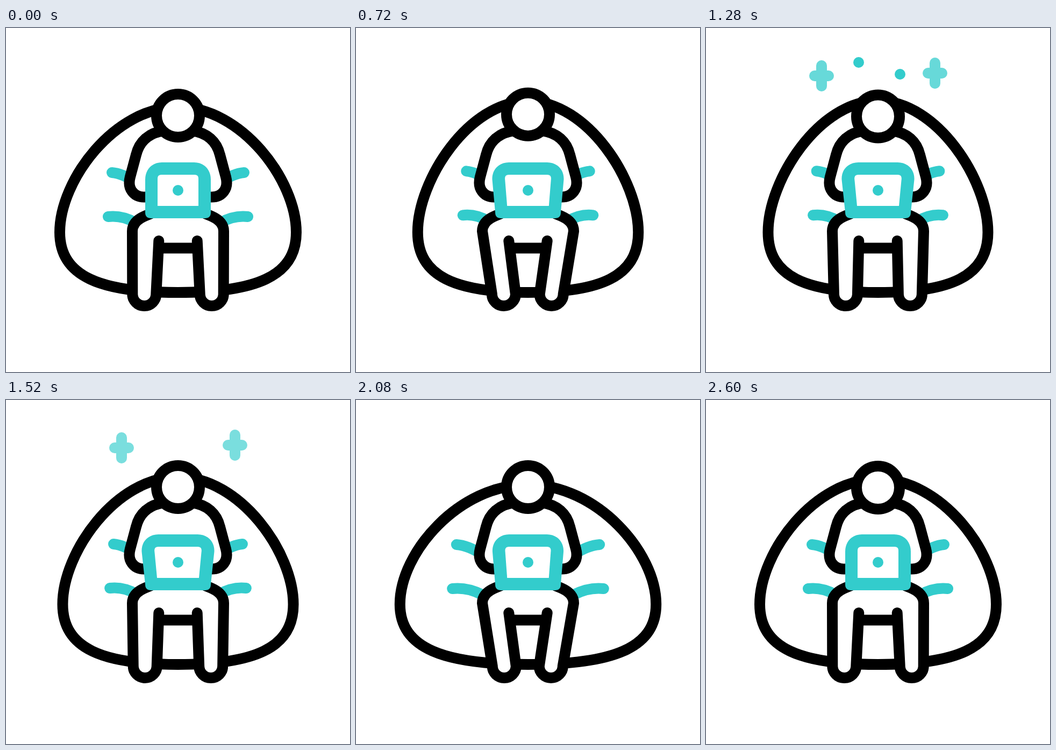
These frames come from a looping animation (640 by 640 pixels, 3000 ms). An HTML page:

```html
<!DOCTYPE html>
<html lang="en">
<head>
<meta charset="utf-8">
<title>Working on a bean bag</title>
<style>
  html, body { margin: 0; width: 100%; height: 100%; overflow: hidden; background: #fff; }
  svg { display: block; width: 100vw; height: 100vh; }
  .line { fill: none; stroke: #000; stroke-width: 20; stroke-linecap: round; stroke-linejoin: round; }
  .white { fill: #fff; }
  .teal { stroke: #3cc; }
  .dot { fill: #3cc; }
</style>
</head>
<body>
<svg viewBox="0 0 640 640">
  <path id="bag" class="line"/>
  <path id="folds" class="line teal"/>

  <path class="line white" d="M264 314.5H257C238 314.5 225 299 231 277L242 236C248 211 266 195 294 191H346C374 195 392 211 398 236L409 277C415 299 402 314.5 383 314.5H376"/>

  <g id="legFill" class="white"><path/><path transform="matrix(-1 0 0 1 640 0)"/></g>
  <path class="line" d="M288 409.5H352"/>
  <g id="legLine" class="line"><path/><path transform="matrix(-1 0 0 1 640 0)"/></g>

  <circle id="head" class="line white" cx="320" r="40"/>

  <path id="laptop" class="dot"/>
  <path id="screen" class="white"/>
  <circle class="dot" cx="320" cy="302" r="10"/>

  <g id="dots" class="dot">
    <circle cx="284" cy="64" r="10"/>
    <circle cx="361" cy="86" r="10"/>
  </g>
  <g id="pluses" class="line teal">
    <path d="M202 89h26M215 70v38"/>
    <path d="M413 84h26M426 65v38"/>
  </g>
</svg>
<script>
  const LOOP = 3000, STEP = 40;
  const FOOT = 257.3;
  const $ = id => document.getElementById(id);
  const smooth = p => p * p * (3 - 2 * p);
  const out = p => 1 - (1 - p) ** 2;
  const linear = p => p;

  // Each key is [time, value, easing on the way to it].
  const tracks = {
    width: [[220, 220], [1040, 202.6, out], [1380, 205], [1880, 255], [2600, 220, out]],
    swing: [[220, 0], [820, 19], [1420, 0], [2020, 19], [2600, 0]],
    head: [[220, 163], [660, 159.8], [980, 169], [1480, 162], [1860, 160.8], [2280, 163]],
    tilt: [[220, 0], [1040, 6.5, out], [1880, 6.5], [2540, 0]],
    dots: [[1000, 0], [1160, 1], [1340, 1], [1500, 0]],
    pluses: [[1160, 0], [1340, 1], [1450, 1], [1650, 0, linear]]
  };

  function at(name, t) {
    const keys = tracks[name];
    if (t <= keys[0][0]) return keys[0][1];
    for (let i = 1; i < keys.length; i++) {
      const [t0, v0] = keys[i - 1], [t1, v1, ease = smooth] = keys[i];
      if (t < t1) return v0 + (v1 - v0) * ease((t - t0) / (t1 - t0));
    }
    return keys[keys.length - 1][1];
  }

  function drawBag(w) {
    const d = w - 220;
    const top = 147 + 0.66 * d - 0.005 * d * d;
    const lift = Math.min(0, 0.18 * d);
    const side = s => {
      const p = (u, y) => `${320 + s * u * w} ${y} `;
      return {
        edge: 'M' + p(0, top) + 'C' + p(0.54, top) + p(1, 284) + p(1, 380) +
          'C' + p(1, 463) + p(0.65, 492) + p(0, 492),
        folds: 'M' + p(0.559, 269 + lift) + 'Q' + p(0.47, 270.5 + lift) + p(0.36, 287 + lift) +
          'M' + p(0.591, 351 + lift) + 'Q' + p(0.475, 348 + lift) + p(0.36, 362 + lift)
      };
    };
    const l = side(-1), r = side(1);
    $('bag').setAttribute('d', l.edge + r.edge);
    $('folds').setAttribute('d', l.folds + r.folds);
  }

  const leg = x =>
    `M270 345L258 350Q235 360 235 378L${x - 22} 495A22 22 0 0 0 ${x + 22} 495L284.3 396`;

  // The right leg swings slightly further than the left.
  function drawLegs(swing) {
    for (const id of ['legFill', 'legLine']) {
      const [left, right] = $(id).children;
      left.setAttribute('d', leg(FOOT + swing));
      right.setAttribute('d', leg(FOOT + swing * 1.08));
    }
  }

  function drawLaptop(s) {
    const l = 259 - s, r = 381 + s, a = 282 - s * 0.9, b = 358 + s * 0.9;
    const k = s * 0.15;
    $('laptop').setAttribute('d',
      `M259 343L${l} 282C${l - k} 263 ${l + 13} 250 ${l + 31} 250H${r - 31}` +
      `C${r - 13} 250 ${r + k} 263 ${r} 282L381 343Q381 354 370 354H270Q259 354 259 343Z`);
    $('screen').setAttribute('d',
      `M${282 - k} 331L${a} 280Q${a} 273 ${a + 7} 273H${b - 7}Q${b} 273 ${b} 280L${358 + k} 331Z`);
  }

  function draw(t) {
    drawBag(at('width', t));
    drawLegs(at('swing', t));
    drawLaptop(at('tilt', t));
    $('head').setAttribute('cy', at('head', t));
    $('dots').setAttribute('opacity', at('dots', t));
    $('pluses').setAttribute('opacity', at('pluses', t));
  }

  function tick() {
    draw(Math.floor(performance.now() % LOOP / STEP) * STEP);
    requestAnimationFrame(tick);
  }
  tick();
</script>
</body>
</html>
```
